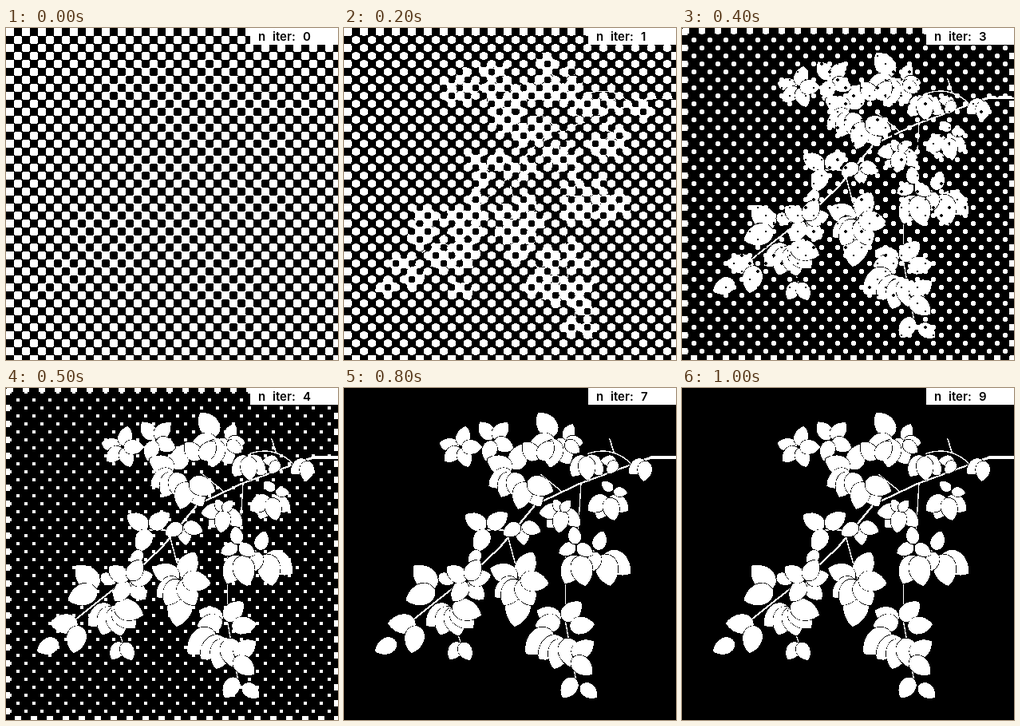
An HTML page with a canvas for the animation above (1100 ms loop, 416 by 416 pixels).

```html
<!DOCTYPE html>
<html lang="en">
<head>
<meta charset="utf-8">
<title>Contour evolution</title>
<style>
  html, body { margin: 0; width: 100%; height: 100%; overflow: hidden; background: #000; }
  canvas, svg { position: absolute; left: 0; top: 0; width: 416px; height: 416px; }
  canvas { image-rendering: pixelated; }
  text { font: 600 15px Inter, Roboto, sans-serif; }
</style>
</head>
<body>
<canvas id="stage" width="416" height="416"></canvas>
<svg viewBox="0 0 416 416">
  <rect x="306" width="110" height="21" fill="#fff"/>
  <text x="316" y="16">n</text>
  <text x="334" y="16">iter:</text>
  <text id="count" x="372" y="16">0</text>
</svg>
<script>
const SIZE = 416, CELL = 10, LOOP = 1100;
const ctx = document.getElementById('stage').getContext('2d', { willReadFrequently: true });
const count = document.getElementById('count');

// Cell widths left after each iteration
const whiteSize = [9.8, 9.2, 8.2, 6.6, 4.6];
const blackSize = [9.6, 8, 6, 3];
const edgeDepth = [10, 9, 8, 7, 5, 2];

const layer = document.createElement('canvas');
layer.width = layer.height = SIZE;
const branch = layer.getContext('2d');

function stem(width, path) {
  branch.lineWidth = width;
  branch.stroke(new Path2D(path));
}

// Leaves of one length fanning out from a node, one per angle in degrees
function sprig(x, y, len, ...angles) {
  for (const a of angles) {
    branch.save();
    branch.translate(x, y);
    branch.rotate(a * Math.PI / 180);
    branch.scale(len, len);
    branch.beginPath();
    branch.moveTo(.06, 0);
    branch.bezierCurveTo(.12, .45, .74, .43, 1, 0);
    branch.bezierCurveTo(.74, -.43, .12, -.45, .06, 0);
    branch.restore();
    branch.stroke();
    branch.fill();
  }
}

function drawBranch() {
  branch.fillRect(0, 0, SIZE, SIZE);
  branch.lineJoin = branch.lineCap = 'round';
  branch.fillStyle = branch.strokeStyle = '#fff';
  stem(3.4, 'M416 87H385L360 96');
  stem(2.2, 'M360 96L295 120 240 146 195 200 165 228 72 302');
  stem(1.6, 'M306 82Q336 72 360 95M333 64L338 80M272 129L246 108');
  stem(1.4, 'M297 119L293 185M205 185L220 240M278 195L277 290 291 368M176 178H203M140 300L147 322');

  branch.strokeStyle = '#000';
  branch.lineWidth = 1.3;
  // crown
  sprig(265, 62, 38, -125, 155, 62, 100);
  sprig(277, 66, 23, -65, 8, 40);
  sprig(187, 65, 28, -127, -50, 25, 110);
  sprig(146, 74, 27, 190, 138, 68, -75, 0);
  sprig(212, 104, 36, -70, 205, 148, 115, 78);
  sprig(228, 116, 37, 60, 105, 22);
  sprig(244, 91, 30, -130, -55);
  // right
  sprig(303, 84, 32, 123, 50, 85);
  sprig(342, 91, 20, 180, 125);
  sprig(378, 90, 27, 140, 95);
  sprig(331, 136, 31, 115, 145, 35, 75);
  sprig(337, 129, 18, 8, 220);
  sprig(274, 152, 30, 130, 170, 45, 100);
  sprig(272, 155, 18, -120, -50);
  sprig(325, 206, 43, 38, 78);
  sprig(316, 204, 26, -70, 140, 100);
  sprig(294, 208, 41, 115, 78);
  sprig(291, 197, 24, 155, 30, -100);
  // middle
  sprig(179, 176, 32, 212, -37, 115);
  sprig(222, 171, 26, 82, 20, 150);
  sprig(170, 203, 22, 125);
  sprig(222, 252, 48, 100);
  sprig(219, 239, 38, -62, 200, 143, 120, 62, 10);
  // left
  sprig(116, 252, 41, 226, 160);
  sprig(118, 234, 22, 30);
  sprig(92, 296, 37, 182, 102);
  sprig(67, 317, 31, 155);
  sprig(134, 272, 40, 140, 110, 75, 46, 18);
  sprig(154, 242, 31, 48, 125, -15, 215, -60);
  sprig(146, 318, 26, 122, 62);
  // bottom
  sprig(273, 292, 34, -45, 203, 170);
  sprig(262, 302, 46, 138);
  sprig(281, 299, 33, -5);
  sprig(276, 312, 42, 140, 108, 70);
  sprig(285, 337, 34, -35, 40);
  sprig(290, 362, 31, 121);
  sprig(296, 371, 27, 38);
}

function noise(i, j) {
  const v = Math.sin(i * 12.99 + j * 78.23) * 43758.5;
  return v - Math.floor(v);
}

function drawCells(step) {
  const n = Math.ceil(SIZE / CELL);
  for (let j = 0; j < n; j++) for (let i = 0; i < n; i++) {
    const white = (i + j) % 2 === 0;
    let size = (white ? whiteSize : blackSize)[step] || 0;
    if (!size) continue;
    if (!white && step > 1) size *= .75 + .5 * noise(i, j);
    const pad = (CELL - size) / 2;
    ctx.fillStyle = white ? '#fff' : '#000';
    ctx.beginPath();
    ctx.roundRect(i * CELL + pad, j * CELL + pad, size, size, Math.min(size / 2, 2 + step * .4));
    ctx.fill();
  }
}

// White cells survive longest along the border
function drawEdges(step) {
  const depth = edgeDepth[step];
  if (!depth) return;
  const len = CELL - step * .5, pad = (CELL - len) / 2, far = Math.min(depth, 6);
  ctx.fillStyle = '#fff';
  for (let p = 0; p < SIZE; p += 2 * CELL) {
    ctx.fillRect(p + pad, 0, len, depth);
    ctx.fillRect(0, p + pad, depth, len);
    ctx.fillRect(p + CELL + pad, SIZE - far, len, far);
    ctx.fillRect(SIZE - far, p + CELL + pad, far, len);
  }
}

function threshold() {
  const img = ctx.getImageData(0, 0, SIZE, SIZE), d = img.data;
  for (let i = 0; i < d.length; i += 4) d[i] = d[i + 1] = d[i + 2] = d[i] > 127 ? 255 : 0;
  ctx.putImageData(img, 0, 0);
}

let shown = -1;
function render(now) {
  const step = Math.max(0, Math.floor((now % LOOP) / 100) - 1);
  if (step === shown) return;
  shown = step;
  ctx.drawImage(layer, 0, 0);
  drawCells(step);
  drawEdges(step);
  threshold();
  count.textContent = step;
}

drawBranch();
const start = performance.now();
function tick() {
  render(performance.now() - start);
  requestAnimationFrame(tick);
}
tick();
</script>
</body>
</html>
```
